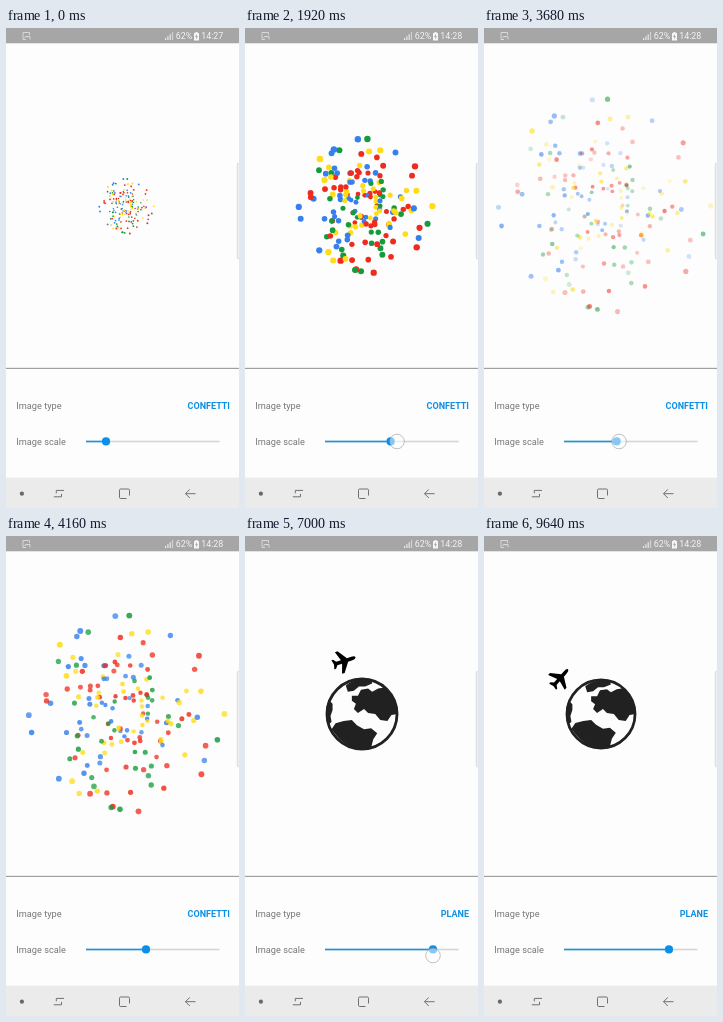
An HTML page for the animation above (9680 ms loop, 233 by 480 pixels).

```html
<!DOCTYPE html>
<html lang="en">
<head>
<meta charset="utf-8">
<title>Image scale demo</title>
<style>
  html, body { margin: 0; width: 100%; height: 100%; overflow: hidden; background: #fdfdfd; }
  svg { display: block; width: 100vw; height: 100vh; }
  text { font-family: Roboto, sans-serif; font-size: 9.2px; }
  .label { fill: #777; }
  .value { fill: #0f8fe4; font-size: 9px; font-weight: 700; text-anchor: end; }
  .status { fill: #f4f4f4; font-size: 8.9px; }
  .line { fill: none; stroke: #707070; stroke-width: 1; }
</style>
</head>
<body>
<svg viewBox="0 0 233 480" preserveAspectRatio="none">
  <rect width="233" height="480" fill="#fdfdfd"/>
  <g id="confetti"></g>
  <g id="world">
    <g id="globe" fill="#212121">
      <circle r="34.5" fill="#fdfdfd" stroke="#212121" stroke-width="2.8"/>
      <path d="M-10 -18 L-4 -18 L-1 -24 L6 -25 L10 -22 L16 -25 L22 -26 Q34 -17 35 0 L29 1 L25 7 L18 6 L13 0 L6 -1 L2 -5 L-4 -1 L-8 -5 L-6 -10 L-10 -13Z"/>
      <path d="M-30 15 L-26 9 L-18 7 L-10 6 L-5 11 L2 15 L9 14 L15 19 L11 25 L9 33 Q-14 39 -30 15Z"/>
      <path d="M-16 -28 Q-6 -36 9 -34 L10 -30 L3 -27 L-3 -27 L-8 -23 L-14 -22Z"/>
      <path d="M-33 -14 L-29 -10 L-29 -4 L-31 2 L-30 8 L-34 11 Q-37 -3 -33 -14Z"/>
    </g>
    <path id="plane" d="M0 -10.5 Q1.6 -10 1.6 -7 V-3 L10 3 V5.4 L1.6 2.6 V7 L4.2 9 V10.6 L0 9.6 L-4.2 10.6 V9 L-1.6 7 V2.6 L-10 5.4 V3 L-1.6 -3 V-7 Q-1.6 -10 0 -10.5Z"/>
  </g>

  <rect width="233" height="15.3" fill="#a6a6a6"/>
  <g fill="none" stroke="#fff" stroke-width=".8" opacity=".7">
    <path d="M23.5 7 V4.5 H17 V11.5 H20 M18.5 10 L20 8 L21.5 9.5"/>
    <path d="M21 8.5 H24 V11.5"/>
  </g>
  <g fill="#fff">
    <path d="M159 10 h1.2 v2 h-1.2z M161.3 8.3 h1.2 v3.7 h-1.2z M163.6 6.3 h1.2 v5.7 h-1.2z" opacity=".75"/>
    <path d="M165.9 4 h1.2 v8 h-1.2z" opacity=".5"/>
    <path d="M188 5 h1.4 v-1 h2.2 v1 h1.4 v7.5 h-5z" opacity=".9"/>
  </g>
  <path d="M191 5.8 L189 9 H190.3 L190 11.5 L192 8.3 H190.7Z" fill="#a6a6a6"/>
  <text class="status" x="169.8" y="11.4">62%</text>
  <text class="status" x="195.2" y="11.4" id="clock">14:27</text>

  <rect x="231.3" y="135" width="4" height="96" rx="2" fill="#f0f0f0" stroke="#cfcfcf" stroke-width=".7"/>
  <rect y="339.8" width="233" height="1.2" fill="#a0a0a0"/>
  <text class="label" x="10.3" y="381">Image type</text>
  <text class="label" x="10.3" y="417">Image scale</text>
  <text class="value" x="224" y="381" id="type">CONFETTI</text>

  <rect x="80" y="412.7" width="133.5" height="1.6" fill="#d4d4d4"/>
  <rect x="80" y="412.7" height="1.6" fill="#1696e8" id="fill"/>
  <circle cy="413.4" r="4.1" fill="#0b90ea" id="thumb"/>
  <circle id="touch" r="7.3" fill="#fff" fill-opacity=".5" stroke="#8c8c8c" stroke-opacity=".6" stroke-width=".9"/>

  <rect y="449.6" width="233" height="31" fill="#ebebeb"/>
  <circle cx="15.9" cy="465.7" r="2.1" fill="#686868"/>
  <g class="line">
    <path d="M50.3 465.3 V462.4 H58 M55.5 465.9 V468.8 H47.8"/>
    <path d="M120.5 470.5 H114.7 Q113.5 470.5 113.5 469.3 V462.2 Q113.5 461 114.7 461 H122.3 Q123.5 461 123.5 462.2 V467.5"/>
    <path d="M189.5 465.7 H179.5 M183.8 461.4 L179.5 465.7 L183.8 470"/>
  </g>
</svg>
<script>
const LOOP = 9680, SWITCH = 4640;
const BURST = 1010, ORBIT = 2840, FASTEST = 9200;
const COLOURS = ['#f02b1d', '#ffdc14', '#3580ee', '#159b3b'];

const ui = {};
for (const el of document.querySelectorAll('[id]')) ui[el.id] = el;

// Turning points of the finger: [time, slider position].
const stops = [[1500, 100], [1980, 152], [2120, 152], [2800, 110], [3100, 110], [3870, 140],
  [5060, 140], [5540, 164], [6000, 153], [6850, 188], [7200, 188], [7500, 185]];

const clamp = v => Math.min(1, Math.max(0, v));
const between = (t, a, b) => t >= a && t < b;

function slider(t) {
  const i = Math.max(1, stops.findIndex(s => s[0] > t));
  const [[t0, x0], [t1, x1]] = t < stops.at(-1)[0] ? [stops[i - 1], stops[i]] : stops.slice(-2);
  return x0 + (x1 - x0) * clamp((t - t0) / (t1 - t0));
}

let seed = 20;
const random = () => (seed = (seed * 16807) % 2147483647) / 2147483647;

const dots = Array.from({ length: 175 }, () => {
  const angle = random() * Math.PI * 2;
  const reach = .15 + .85 * Math.pow(random(), 1.25);
  const node = document.createElementNS('http://www.w3.org/2000/svg', 'circle');
  node.setAttribute('fill', COLOURS[Math.floor(Math.pow(random(), 1.2) * 4)]);
  ui.confetti.append(node);
  return {
    node,
    x: Math.cos(angle) * reach,
    y: Math.sin(angle) * reach,
    size: 4.3 + 1.8 * reach + random() * .6,
    rest: .12 + random() * .45
  };
});

function drawConfetti(t, scale) {
  const u = ((t + 270) % BURST) / BURST;
  const spread = 280 * scale * (1 - Math.exp(-4 * u));
  const fade = Math.pow(clamp((u - .28) / .72), .6);
  for (const { node, x, y, size, rest } of dots) {
    node.setAttribute('cx', 120.5 + x * spread);
    node.setAttribute('cy', 178.5 + y * spread);
    node.setAttribute('r', size * scale);
    node.setAttribute('opacity', 1 - (1 - rest) * fade);
  }
}

function drawWorld(t, scale) {
  const k = scale * 1.25;
  const phase = (t - FASTEST) / ORBIT * 360;
  const angle = 142 + phase + 28.6 * Math.sin(phase * Math.PI / 180);
  ui.globe.setAttribute('transform', `translate(117 178) scale(${k})`);
  ui.plane.setAttribute('transform',
    `translate(117 178) rotate(${angle}) translate(${55 * k} 0) rotate(180) scale(${1.12 * k})`);
}

function drawTouch(t) {
  const tapping = between(t, 4500, 4600);
  const shown = tapping || between(t, 1400, 3930) || between(t, 5060, 7560);
  ui.touch.style.display = shown ? '' : 'none';
  // The thumb trails the finger a little.
  ui.touch.setAttribute('cx', tapping ? 204 : slider(t + 62));
  ui.touch.setAttribute('cy', tapping ? 378 : 413.5 + 6 * clamp((t - 5400) / 500));
}

function draw(t) {
  const x = slider(t), scale = (x - 80) / 133;
  const plane = t >= SWITCH;
  ui.thumb.setAttribute('cx', x);
  ui.fill.setAttribute('width', x - 80);
  ui.clock.textContent = t < 500 ? '14:27' : '14:28';
  ui.type.textContent = plane ? 'PLANE' : 'CONFETTI';
  ui.confetti.style.display = plane ? 'none' : '';
  ui.world.style.display = plane ? '' : 'none';
  (plane ? drawWorld : drawConfetti)(t, scale);
  drawTouch(t);
}

const start = performance.now();
function tick() {
  draw((performance.now() - start) % LOOP);
  requestAnimationFrame(tick);
}
tick();
</script>
</body>
</html>
```
